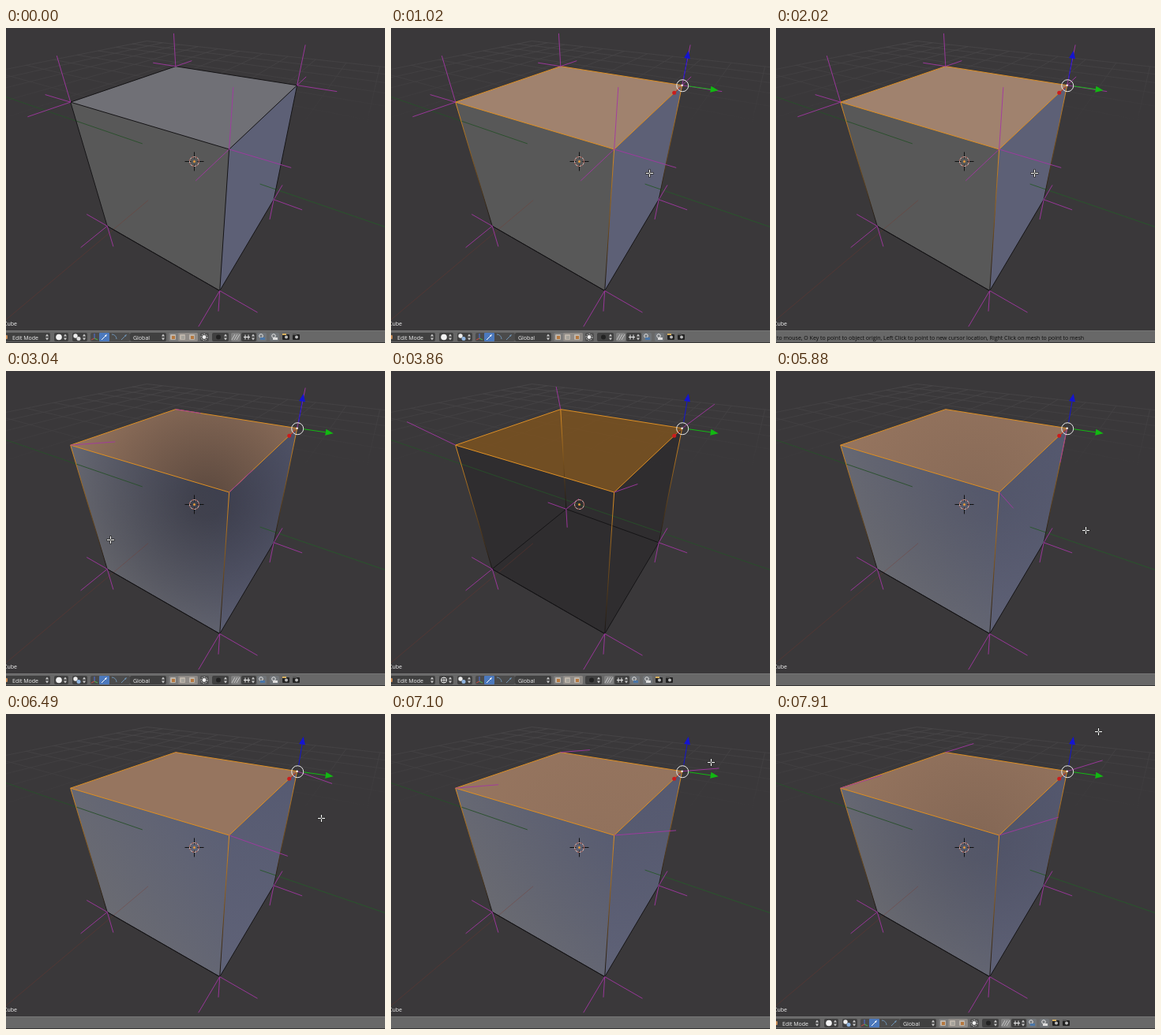
An HTML page with a canvas that plays this animation: 480x400 px, repeating every 8 s.

```html
<!DOCTYPE html>
<html lang="en">
<head>
<meta charset="utf-8">
<title>Cube normals</title>
<style>
html, body { margin: 0; width: 100%; height: 100%; overflow: hidden; background: #3a383a; }
canvas { display: block; }
</style>
</head>
<body>
<canvas id="stage" width="480" height="400"></canvas>
<script>
const ctx = document.getElementById('stage').getContext('2d');
const LOOP = 8000, STEP = 202.8, LAST = 39;
const BACK = '#3a383a', MAGENTA = '#a337a3', ORANGE = '#df9024', INK = '#151416';
const REACH = 0.49;

// Camera: vanishing points of the three axes (left, right, down) with their weights
const ORIGIN = [238.5, 169], EYE = [249, 176];
const AXES = [[-387, -46, 0.1173], [496, -48, 0.185], [249, 660, 0.1504]];
const screenAxis = k => AXES.map(a => a[2] * (a[k] - EYE[k]));
const RIGHT = screenAxis(0), DOWN = screenAxis(1);

function project(p) {
  const sum = k => p.reduce((s, v, i) => s + v * AXES[i][2] * (k < 2 ? AXES[i][k] : 1), k < 2 ? ORIGIN[k] : 1);
  return [sum(0) / sum(2), sum(1) / sum(2)];
}

const add = (p, q, k = 1) => p.map((v, i) => v + q[i] * k);
const unit = v => v.map(c => c / (Math.hypot(...v) || 1));
const mix = (a, b, k) => a.map((v, i) => v + (b[i] - v) * k);
const rgb = c => `rgb(${c.map(Math.round).join(',')})`;

// Corners in order around the top (A-D), then below them (E, H, G, F)
const square = [[1, -1], [1, 1], [-1, 1], [-1, -1]];
const [A, B, C, D] = square.map(s => [...s, -1]);
const [E, H, G, F] = square.map(s => [...s, 1]);
const TOP = [A, B, C, D], BASE = [E, H, G, F];

const cursorKeys = [
  [10, [327, 184]], [15, [132, 214]], [29, [392, 202]], [35, [405, 61]], [39, [408, 22]]
];

function cursorAt(n) {
  const i = Math.max(1, cursorKeys.findIndex(k => n <= k[0]));
  const [n0, p] = cursorKeys[i - 1], [n1, q] = cursorKeys[i];
  return mix(p, q, Math.max(0, (n - n0) / (n1 - n0)));
}

function blend(p, q, c0, c1) {
  const g = ctx.createLinearGradient(...p, ...q);
  g.addColorStop(0, c0);
  g.addColorStop(1, c1);
  return g;
}

function line(p, q, color, width = 1) {
  ctx.strokeStyle = color;
  ctx.lineWidth = width;
  ctx.beginPath();
  ctx.moveTo(...p);
  ctx.lineTo(...q);
  ctx.stroke();
}

function poly(points, fill) {
  ctx.fillStyle = fill;
  ctx.beginPath();
  points.forEach(p => ctx.lineTo(...p));
  ctx.fill();
}

function ring(x, y, r, color, width = 1, from = 0, to = Math.PI * 2) {
  ctx.strokeStyle = color;
  ctx.lineWidth = width;
  ctx.beginPath();
  ctx.arc(x, y, r, from, to);
  ctx.stroke();
}

function dashedRing(x, y, r, color, dash) {
  ctx.setLineDash([dash, dash]);
  ring(x, y, r, color);
  ctx.setLineDash([]);
}

function dot(x, y, r, color) {
  ctx.fillStyle = color;
  ctx.beginPath();
  ctx.arc(x, y, r, 0, Math.PI * 2);
  ctx.fill();
}

function box(x, y, w, h, color, r = 0) {
  ctx.fillStyle = color;
  ctx.beginPath();
  ctx.roundRect(x, y, w, h, r);
  ctx.fill();
}

function label(text, x, y, color) {
  ctx.fillStyle = color;
  ctx.font = '7px "Open Sans", sans-serif';
  ctx.fillText(text, x, y);
}

const edge = (p, q, color, width) => line(project(p), project(q), color, width);
const face = (corners, fill) => poly(corners.map(project), fill);

// Floor lines stop just before they would pass behind the camera
function grid() {
  const fade = blend([0, 10], [0, 120], '#4a484a', BACK);
  for (let n = -8; n <= 8; n++) {
    const near = (own, other) => Math.max(-8, (-0.9 - n * AXES[other][2]) / AXES[own][2]);
    edge([8, n, 0], [near(0, 1), n, 0], fade, 0.8);
    edge([n, 8, 0], [n, near(1, 0), 0], fade, 0.8);
  }
}

function floorAxes(wire) {
  edge([8, 0, 0], [wire ? -7 : 1, 0, 0], '#27502a', 0.9);
  if (!wire) edge([-1, 0, 0], [-7, 0, 0], '#27582b', 0.9);
  edge([0, -1, 0], [0, -4, 0], 'rgba(125,55,42,.4)', 0.9);
}

function edges(selected, wire) {
  const rim = selected ? ORANGE : INK;
  TOP.forEach((p, i) => {
    const q = BASE[i], next = (i + 1) % 4;
    if (wire || p !== B) edge(p, q, blend(project(p), project(q), rim, INK));
    if (wire || (q !== E && q !== H)) edge(q, BASE[next], INK);
    edge(p, TOP[next], rim);
  });
  // The base edges that touch the left corner
  edge(E, F, INK);
}

function solidCube(selected, merged, shadow) {
  const down = (p, q, a, b) => blend(project(p), project(q), rgb(a), rgb(b));
  const grey = [88, 88, 88], blue = [93, 96, 118];
  face([A, D, F, E], merged ? down(D, E, [91, 95, 117], [106, 107, 114]) : rgb(grey));
  face([D, C, G, F], merged ? down(C, F, [86, 90, 113], [95, 98, 119]) : rgb(blue));
  face(TOP, rgb(merged ? [150, 117, 95] : selected ? [160, 130, 110] : [112, 112, 118]));
  if (shadow) {
    const shade = ctx.createRadialGradient(255, 165, 20, 255, 165, 190);
    shade.addColorStop(0, `rgba(22,20,24,${shadow})`);
    shade.addColorStop(1, 'rgba(22,20,24,0)');
    face([A, B, C, G, F, E], shade);
  }
}

function wireCube() {
  face([A, D, C, G, F, E], 'rgba(42,41,42,.65)');
  face(TOP, 'rgba(124,83,32,.84)');
}

// What the top normals follow at each stage
function aimOf(n) {
  if (n < 12) return null;
  if (n < 17) return { point: C, shadow: 0.42 };
  if (n < 27) return { outward: true };
  if (n < 32) return { point: G, shadow: 0.1 };
  const [x, y] = cursorAt(n);
  const [dx, dy] = [x - 237, y - 75];
  return { way: unit(add(RIGHT.map(v => v * dx), DOWN, dy)), shadow: Math.max(0, -dy / 400) };
}

function normals(aim) {
  const splits = v => v.map((s, i) => v.map((_, k) => k === i ? s : 0));
  const rays = [];
  for (const v of [...TOP, ...BASE]) {
    let ways = splits(v);
    if (aim && v[2] < 0) {
      if (aim.outward) ways = [unit(v)];
      else if (aim.way) ways = [aim.way];
      else if (aim.point === v) ways = [[0, 0, -1]];
      else ways = [unit(add(aim.point, v, -1))];
    }
    ways.forEach(way => rays.push([v, add(v, way, REACH)]));
  }
  return rays;
}

const facing = ([, tip]) => tip.some(c => c < -0.999);
const drawRay = ([p, q]) => edge(p, q, MAGENTA, 0.9);

function pivotMark(wire) {
  const [x, y] = ORIGIN;
  if (!wire) {
    for (const [u, v] of square.map(([a, b]) => [(a + b) / 2, (a - b) / 2])) {
      line([x + u * 4, y + v * 4], [x + u * 12, y + v * 12], '#111');
    }
  }
  ring(x, y, 6, '#ddd2cc');
  dashedRing(x, y, 6, '#8f342c', 2.4);
  dot(x, y, 1.5, '#e69a3c');
}

function arrow(from, to, color, size) {
  const [ux, uy] = unit([to[0] - from[0], to[1] - from[1]]);
  const neck = [to[0] - ux * size, to[1] - uy * size];
  const wing = t => [neck[0] - uy * t, neck[1] + ux * t];
  line(from, neck, color);
  poly([to, wing(size * 0.4), wing(-size * 0.4)], color);
}

function gizmo() {
  const [x, y] = project(C);
  line([x - 2, y + 2], [x - 9, y + 9], '#b81a1a');
  dot(x - 10, y + 9.5, 2.5, '#cc1c1c');
  arrow([x + 2, y - 8], [x + 8, y - 44], '#1414d0', 10);
  arrow([x + 8, y + 1], [x + 46, y + 6.5], '#12b812', 10);
  ring(x + 0.5, y + 0.5, 7.5, '#e8e8e8');
  dot(x, y, 1.2, '#f4f4f4');
}

function mouse(p) {
  const [x, y] = p.map(v => Math.round(v) + 0.5);
  for (const [color, w, r] of [['#222', 3, 5], ['#fff', 1.2, 4.5]]) {
    line([x - r, y], [x + r, y], color, w);
    line([x, y - r], [x, y + r], color, w);
  }
  dot(x, y, 0.9, '#444');
}

const button = (x, w, color) => box(x, 387, w, 11, color, 2);

function menu(x, w, text = '', inset = 4) {
  button(x, w, '#404040');
  label(text, x + inset, 396, '#f0f0f0');
  for (const s of [-1, 1]) {
    const ax = x + w - 4, ay = 392.5 + s;
    poly([[ax - 2, ay], [ax + 2, ay], [ax, ay + s * 3]], '#ccc');
  }
}

function snapIcons() {
  menu(261, 21);
  dot(269, 392.5, 3, '#222');
  button(285, 12, '#808080');
  for (const s of [0, 3, 6]) line([286 + s, 396], [290 + s, 389], '#ccc', 0.9);
  menu(298, 19);
  for (const x of [303, 307]) line([x, 389.5], [x, 395.5], '#eee');
  line([301, 392.5], [309, 392.5], '#eee');
  for (const x of [318, 334]) {
    button(x, 12, '#707478');
    ring(x + 5, 391, 2.3, '#e4e4e4');
    box(x + 4, 393, 6, 3, x < 330 ? '#4a76a8' : '#ddd');
  }
  for (const x of [350, 363]) {
    box(x, 389, 9, 7, '#222', 1);
    dot(x + 5, 392.5, 2, '#bbb');
    box(x, 388, 5, 2, x < 360 ? '#d8b05e' : '#555');
  }
}

function header(wire, selected) {
  menu(-4, 60, 'Edit Mode', 12);
  box(-2, 390, 4, 5, '#c98b55', 1);
  menu(61, 18);
  if (wire) {
    ring(67, 392.5, 3.5, '#eee');
    line([67, 389], [67, 396], '#eee', 0.8);
    line([63, 392.5], [71, 392.5], '#eee', 0.8);
  } else dot(67, 392.5, 3.8, '#f3f3f3');
  menu(84, 19);
  dot(88, 391, 2.7, '#eee');
  dot(92, 394.5, 2.5, selected ? '#8fb4e0' : '#ddd');

  button(107, 50, '#4b4b4b');
  line([112, 394], [112, 388], '#4f72e0');
  line([112, 394], [116, 396], '#4db84d');
  line([112, 394], [108, 396], '#cc4a42');
  box(118, 387, 13, 11, '#4c79bd', 1);
  arrow([121, 396], [128, 389], '#fff', 3);
  ring(134, 395, 6, '#6f93b4', 1, -Math.PI / 2, 0);
  arrow([146, 396], [153, 389], '#6f93b4', 3);
  menu(157, 46, 'Global');

  button(206, 37, '#7a7a7a');
  button(218, 25, '#8f8b87');
  for (const x of [208, 220, 232]) {
    box(x, 389, 7, 7, '#bdb5ab', 1);
    box(x + 2, 391, 4, 4, x === 220 ? '#a5a39c' : '#b5783f');
  }
  if (!wire) {
    button(246, 11, '#505050');
    dot(251, 392.5, 2.4, '#eee');
    dashedRing(251, 392.5, 4, '#ddd', 1.5);
  }
  ctx.save();
  if (wire) ctx.translate(-15, 0);
  snapIcons();
  ctx.restore();
}

function bar(n, wire, selected) {
  box(0, 384, 480, 16, '#686868');
  box(0, 384, 480, 1, '#767676');
  box(0, 399, 480, 1, '#333');
  if (n >= 7 && n < 13) {
    label('to mouse, O Key to point to object origin, Left Click to point to new cursor location, Right Click on mesh to point to mesh', 1, 395.5, '#0c0c0c');
  } else if (n < 27 || n >= 38) header(wire, selected);
}

function draw(n) {
  const selected = n >= 3, wire = n >= 18 && n < 27;
  const aim = aimOf(n), rays = normals(aim);

  box(0, 0, 480, 400, BACK);
  ctx.save();
  ctx.translate(0, 0.5);
  grid();
  if (!wire) {
    rays.filter(r => !facing(r)).forEach(drawRay);
    solidCube(selected, !!aim, aim?.shadow);
  } else wireCube();
  floorAxes(wire);
  edges(selected, wire);
  rays.filter(r => wire || facing(r)).forEach(drawRay);
  pivotMark(wire);
  if (selected) gizmo();
  ctx.restore();

  if (n >= 5 && !aim?.outward) mouse(cursorAt(n));
  label('Cube', -3, 377.5, '#f2f2f2');
  bar(n, wire, selected);
}

const start = performance.now();
function tick() {
  const t = (performance.now() - start) % LOOP;
  draw(Math.min(LAST, Math.floor((t + 6) / STEP)));
  requestAnimationFrame(tick);
}
tick();
</script>
</body>
</html>
```
